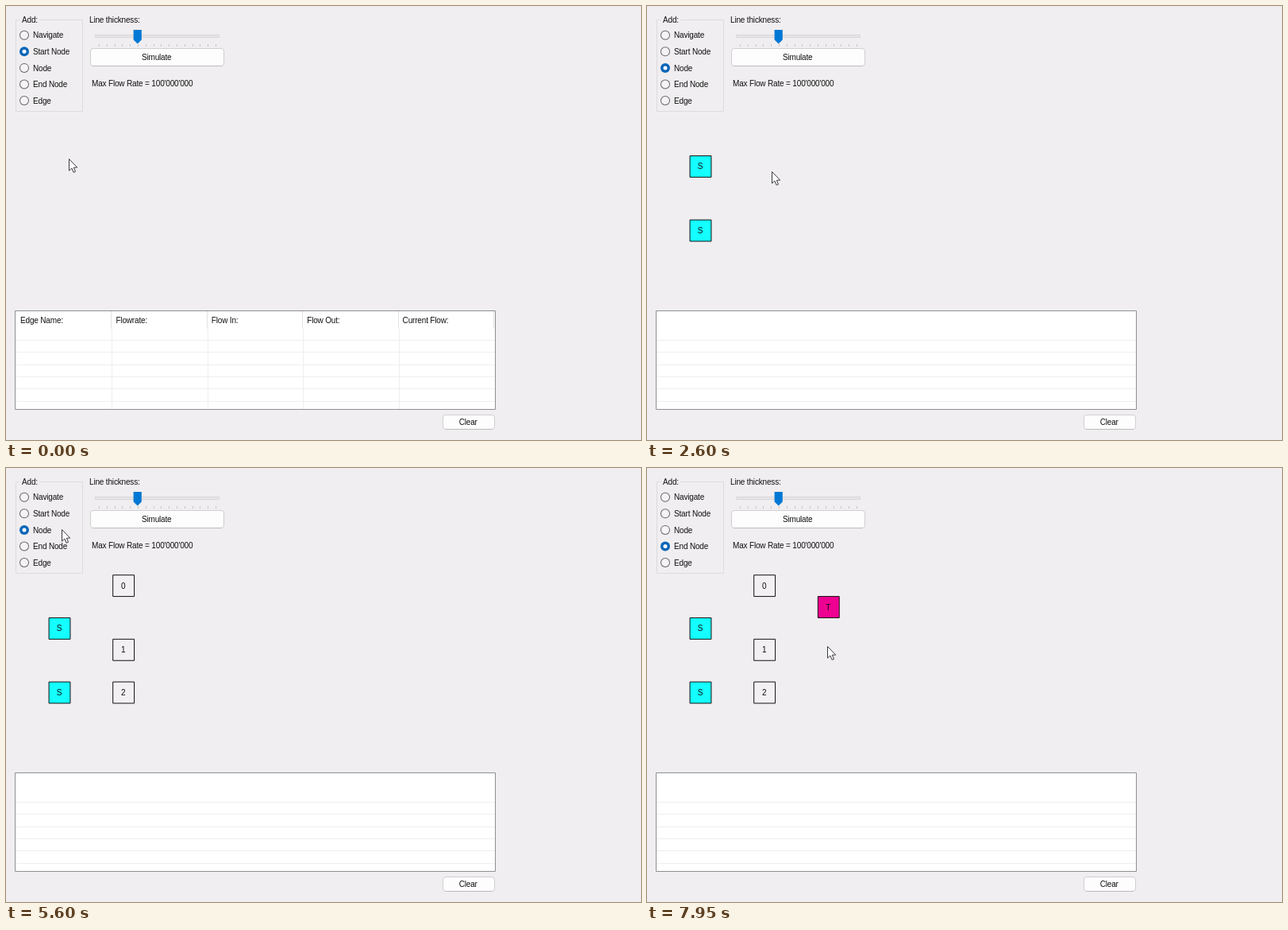
Write an HTML page with a canvas that moves like this. It is 800 px wide and 546 px high and loops after 8000 ms.

```html
<!DOCTYPE html>
<html lang="en">
<head>
<meta charset="utf-8">
<title>Flow network editor</title>
<style>
  html, body { margin: 0; width: 100%; height: 100%; overflow: hidden; background: #f0eef0; }
  canvas { display: block; }
</style>
</head>
<body>
<canvas id="stage" width="800" height="546"></canvas>
<script>
const ctx = document.getElementById('stage').getContext('2d');
const LOOP = 8000, STEP = 50, CELL = 26.88;
const BACK = '#f0eef0';

const modes = ['Navigate', 'Start Node', 'Node', 'End Node', 'Edge'];
const headers = ['Edge Name:', 'Flowrate:', 'Flow In:', 'Flow Out:', 'Current Flow:'];
const fills = { S: '#14ffff', T: '#ee0091' };

const node = (label, col, row, placed) => ({ label, col, row, placed });
const nodes = [
  node('S', 2, 7, 600),
  node('S', 2, 10, 1350),
  node('0', 5, 5, 3350),
  node('1', 5, 8, 4150),
  node('2', 5, 10, 4900),
  node('T', 8, 6, 7550)
];
const [upperStart, lowerStart, node0, node1, node2, sink] = nodes;

const modeY = i => 36.8 + i * 20.55;
const overMode = i => ({ x: 70, y: modeY(i) });
const overNode = n => ({ x: (n.col + 0.5) * CELL, y: (n.row + 0.5) * CELL });
const at = (x, y) => ({ x, y });

// The pointer glides to each place, then waits there for the next move.
const home = at(79, 193);
const move = (start, end, to) => ({ start, end, to });
const moves = [
  move(0, 200, at(77, 213)),
  move(550, 1150, overNode(lowerStart)),
  move(1350, 1900, overMode(2)),
  move(2200, 2600, at(157, 209)),
  move(2950, 3300, overNode(node0)),
  move(3400, 3950, overNode(node1)),
  move(4150, 4750, overNode(node2)),
  move(5100, 5600, overMode(2)),
  move(5600, 5950, at(46, 92)),
  move(6000, 6750, at(174, 177)),
  move(6800, 7350, overNode(sink)),
  move(7500, 7950, at(227, 225))
];

const easeOut = k => 1 - (1 - k) ** 1.5;

function pointerAt(t) {
  return moves.reduce((from, { start, end, to }) => {
    const k = easeOut(Math.min(1, Math.max(0, (t - start) / (end - start))));
    return at(from.x + (to.x - from.x) * k, from.y + (to.y - from.y) * k);
  }, home);
}

function modeAt(t) {
  if (t < 2250) return 1;
  return t < 6000 ? 2 : 3;
}

function text(str, x, y, align = 'left') {
  ctx.fillStyle = '#111';
  ctx.textAlign = align;
  ctx.fillText(str, x, y);
}

function line(x0, y0, x1, y1, color) {
  ctx.strokeStyle = color;
  ctx.beginPath();
  ctx.moveTo(x0, y0);
  ctx.lineTo(x1, y1);
  ctx.stroke();
}

function polygon(points) {
  ctx.beginPath();
  points.forEach(([x, y]) => ctx.lineTo(x, y));
  ctx.closePath();
}

function box(x, y, w, h, fill, stroke, radius = 0) {
  ctx.beginPath();
  ctx.roundRect(x, y, w, h, radius);
  ctx.fillStyle = fill;
  ctx.fill();
  ctx.strokeStyle = stroke;
  ctx.stroke();
}

function disc(x, y, r, color) {
  ctx.beginPath();
  ctx.arc(x, y, r, 0, 2 * Math.PI);
  ctx.fillStyle = color;
  ctx.fill();
}

function button(label, x, y, w, h) {
  box(x, y, w, h, '#fdfdfd', '#d0ced0', 3.5);
  line(x + 3, y + h, x + w - 3, y + h, '#bcbabc');
  text(label, x + w / 2 - 0.8, y + h / 2 + 3.6, 'center');
}

function drawModes(selected) {
  box(12.5, 17.5, 84, 115, BACK, '#dddbdd');
  ctx.fillStyle = BACK;
  ctx.fillRect(17, 16, 25, 4);
  text('Add:', 20, 21.3);
  modes.forEach((label, i) => {
    const y = modeY(i), on = i === selected;
    disc(23, y, 6, on ? '#0b66b8' : '#666');
    disc(23, y, on ? 2.5 : 5, on ? '#fff' : '#f5f3f5');
    text(label, 34, y + 3.6);
  });
}

function drawSlider() {
  text('Line thickness:', 105, 21.3);
  box(112.5, 36.5, 156, 3, '#e8e6e8', '#d7d5d7');
  for (let i = 0; i < 16; i++) {
    const x = Math.round(117 + i * 9.8) + 0.5;
    line(x, 48, x, 51, '#c6c4c6');
  }
  polygon([[160.6, 30], [170.8, 30], [170.8, 42.6], [165.7, 47.6], [160.6, 42.6]]);
  ctx.fillStyle = '#0078d4';
  ctx.fill();
}

function drawTable(showHeaders) {
  box(11.5, 383.5, 605, 124, '#fff', '#8d8f93');
  for (let i = 0; i < 6; i++) {
    const y = Math.round(420 + i * 15.3) + 0.5;
    line(12, y, 616, y, '#efeff0');
  }
  if (!showHeaders) return;
  headers.forEach((label, i) => {
    const x = Math.round(132 + i * 120.5) + 0.5;
    line(x, 384, x, 406, '#e2e2e2');
    if (i < 4) line(x + 1, 406, x + 1, 507, '#eeeeef');
    text(label, 18 + i * 120.4, 398.8);
  });
}

function drawNode({ label, col, row }) {
  const x = col * CELL + 0.3, y = row * CELL + 0.3;
  box(x, y, CELL, CELL, fills[label] || '#f2f0f2', '#111');
  text(label, x + CELL / 2 - 0.5, y + CELL / 2 + 3.5, 'center');
}

function drawPointer({ x, y }) {
  ctx.save();
  ctx.translate(Math.round(x) + 0.5, Math.round(y) - 0.5);
  polygon([[0, 0], [0, 14.6], [3.4, 11.6], [5.6, 16.8], [8, 15.8], [5.8, 10.8], [10.2, 10.6]]);
  ctx.fillStyle = '#fff';
  ctx.fill();
  ctx.strokeStyle = '#3a3a40';
  ctx.stroke();
  ctx.restore();
}

function draw(t) {
  ctx.fillStyle = BACK;
  ctx.fillRect(0, 0, 800, 546);
  ctx.lineWidth = 1;
  ctx.font = '10px "Liberation Sans", Arial, sans-serif';
  ctx.letterSpacing = '-0.17px';

  drawModes(modeAt(t));
  drawSlider();
  button('Simulate', 106.5, 53.5, 168, 22);
  text("Max Flow Rate = 100'000'000", 108, 100.6);
  drawTable(t < upperStart.placed);
  button('Clear', 550.5, 514.5, 65, 18);
  nodes.filter(n => n.placed <= t).forEach(drawNode);
  drawPointer(pointerAt(t));
}

function tick() {
  const t = performance.now() % LOOP;
  draw(Math.floor(t / STEP) * STEP);
  requestAnimationFrame(tick);
}
tick();
</script>
</body>
</html>
```
